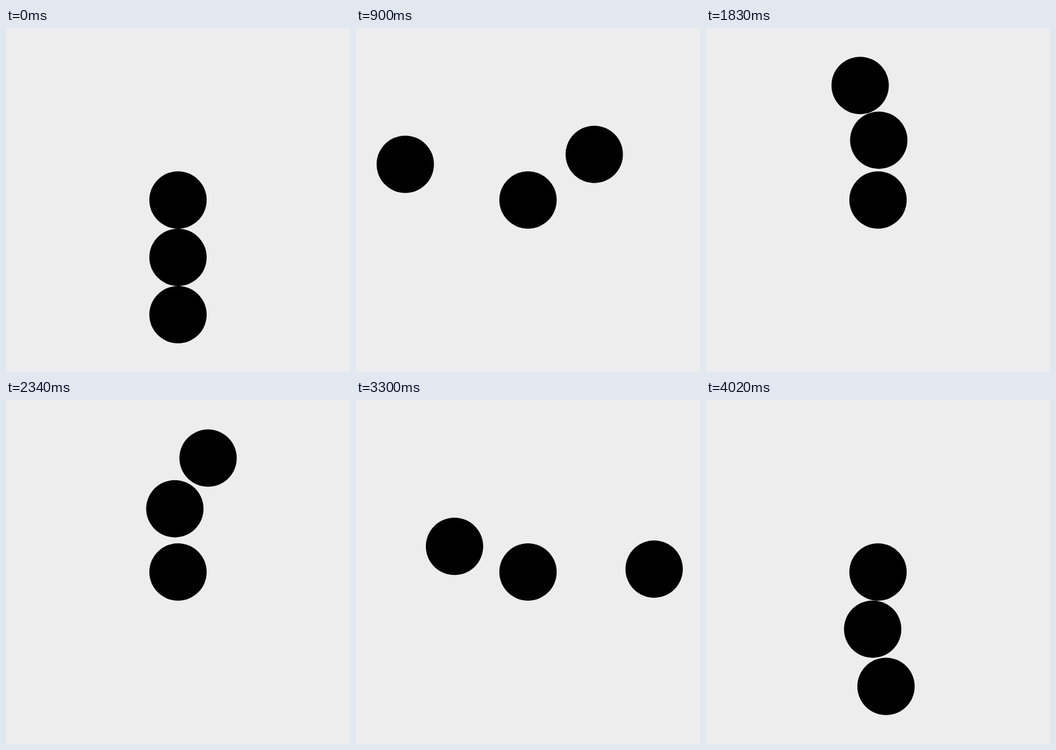
Write an HTML page that moves like this. It is 600 px wide and 600 px high and loops after 4.05 s.

```html
<!DOCTYPE html>
<html lang="en">
<head>
<meta charset="utf-8">
<title>Orbiting dots</title>
<style>
  html, body { margin: 0; width: 100%; height: 100%; overflow: hidden; background: #ededed; }
  svg { display: block; width: 100%; height: 100%; }
</style>
</head>
<body>
<svg viewBox="0 0 600 600">
  <circle cx="300" cy="300" r="50"/>
  <circle id="inner" r="50"/>
  <circle id="outer" r="50"/>
</svg>
<script>
  const LOOP = 4050, STEP = 30, CENTER = 300, SWAY = 100;
  const inner = document.getElementById('inner');
  const outer = document.getElementById('outer');

  // Orbit at the given radius, swaying along the tangent once per turn.
  function place(dot, radius, direction, angle) {
    const sin = Math.sin(angle), cos = Math.cos(angle);
    const sway = SWAY * sin;
    dot.setAttribute('cx', CENTER + direction * (radius * sin + sway * cos));
    dot.setAttribute('cy', CENTER + radius * cos - sway * sin);
  }

  function render(ms) {
    const time = Math.floor((ms % LOOP) / STEP) * STEP;
    const angle = time / LOOP * 2 * Math.PI;
    place(inner, 100, 1, angle);
    place(outer, 200, -1, angle);
  }

  const start = performance.now();
  function tick() {
    render(performance.now() - start);
    requestAnimationFrame(tick);
  }
  tick();
</script>
</body>
</html>
```
